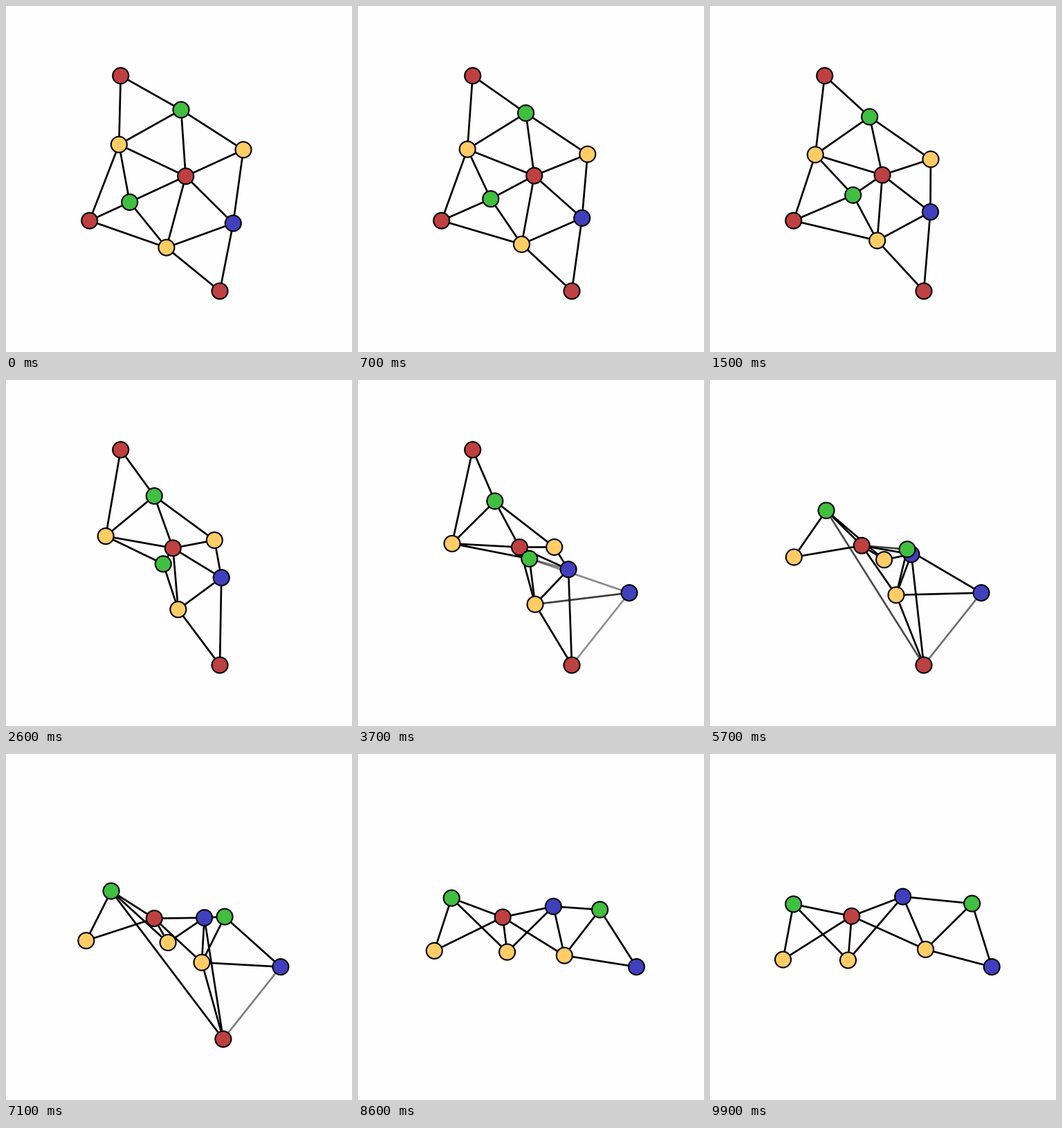
A matplotlib script for the animation above (10 s loop, 500 by 500 pixels).

```python
import numpy as np
import matplotlib.pyplot as plt
from matplotlib.animation import FuncAnimation
from matplotlib.collections import LineCollection
from matplotlib.patches import Circle

SIZE, DPI, FRAMES, INTERVAL = 500, 100, 100, 100
PX = 72 / DPI
RED, GREEN, BLUE, GOLD = "#bf4040", "#40bf40", "#4040bf", "#ffcc66"

# name: colour, start, end, first and last visible frame
NODES = {
    "top": (RED, (165.7, 100.8), (165.7, 100.8), 0, 49),
    "left": (RED, (120.7, 310.2), (120.7, 310.2), 0, 19),
    "low": (RED, (309, 412), (309, 412), 0, 81),
    "far": (BLUE, (392, 307.6), (392, 307.6), 35, 99),
    "y1": (GOLD, (163.3, 200.2), (90.3, 297.1), 0, 99),
    "y2": (GOLD, (343, 207.8), (184.3, 298), 0, 99),
    "y3": (GOLD, (231.9, 349.1), (296.3, 282.4), 0, 99),
    "hub": (RED, (259.7, 246), (189.5, 234.3), 0, 99),
    "b": (BLUE, (328.3, 314), (263.4, 206.1), 0, 99),
    "g1": (GREEN, (253, 150), (105.4, 217), 0, 99),
    "g2": (GREEN, (178.7, 283.5), (363.4, 216.1), 0, 99),
}

STEADY = ("g1-y1 g1-hub g1-y2 y1-hub hub-y2 y2-b hub-b "
          "g2-y3 hub-y3 y3-b").split()

# edge: frames and opacities of its fade
FADES = {
    "left-y1": ((16, 20), (1, 0.3)),
    "left-g2": ((16, 20), (1, 0.3)),
    "left-y3": ((16, 20), (1, 0.3)),
    "top-g1": ((42, 50), (1, 0.35)),
    "top-y1": ((42, 50), (1, 0.35)),
    "y1-g2": ((40, 50, 50.5), (1, 0.4, 0)),
    "hub-g2": ((52, 64, 64.5), (1, 0.4, 0)),
    "b-g2": ((33.5, 34, 50), (0, 0.35, 1)),
    "y3-far": ((35, 40), (0.6, 1)),
    "g2-far": ((35, 48), (0.36, 1)),
    "far-low": ((35, 37, 57, 71, 80), (0.41, 0.43, 0.56, 0.5, 0.4)),
    "g1-low": ((51.5, 52, 62, 74, 82), (0, 0.4, 1, 1, 0.4)),
    "y3-low": ((74, 82), (1, 0.4)),
    "b-low": ((74, 82), (1, 0.4)),
}
EDGES = [tuple(e.split("-")) for e in STEADY + list(FADES)]


def layout(k):
    u = k / (FRAMES - 1)
    pos = {n: (1 - u) * np.array(a) + u * np.array(b)
           for n, (_, a, b, *_) in NODES.items()}
    # keep the bounding box centred once it grows to the left
    shift = max(0, pos["left"][0] - pos["y1"][0]) / 2
    return {n: p + (shift, 0) for n, p in pos.items()}


def visible(name, k):
    first, last = NODES[name][3:]
    return first <= k <= last


def opacity(a, b, k):
    if not (visible(a, k) and visible(b, k)):
        return 0
    fade = FADES.get(f"{a}-{b}")
    return np.interp(k, *fade) if fade else 1


fig = plt.figure(figsize=(SIZE / DPI, SIZE / DPI), dpi=DPI, facecolor="#fefefe")
ax = fig.add_axes([0, 0, 1, 1])
ax.set(xlim=(0, SIZE), ylim=(SIZE, 0))
ax.axis("off")

lines = LineCollection([], linewidths=2.7 * PX, zorder=1)
ax.add_collection(lines)
dots = {}
for z, (name, spec) in enumerate(NODES.items()):
    dots[name] = ax.add_patch(Circle(spec[1], 11.5, fc=spec[0], ec="black",
                                     lw=2.1 * PX, zorder=2 + z))


def update(k):
    pos = layout(k)
    shades = [(a, b, opacity(a, b, k)) for a, b in EDGES]
    shades = sorted((s for s in shades if s[2] > 0), key=lambda s: s[2])
    lines.set_segments([(pos[a], pos[b]) for a, b, _ in shades])
    lines.set_color([(0, 0, 0, o) for *_, o in shades])
    for name, dot in dots.items():
        dot.center = pos[name]
        dot.set_visible(visible(name, k))
    return [lines, *dots.values()]


anim = FuncAnimation(fig, update, frames=FRAMES, interval=INTERVAL,
                     repeat=True, repeat_delay=0)
plt.show()
```
